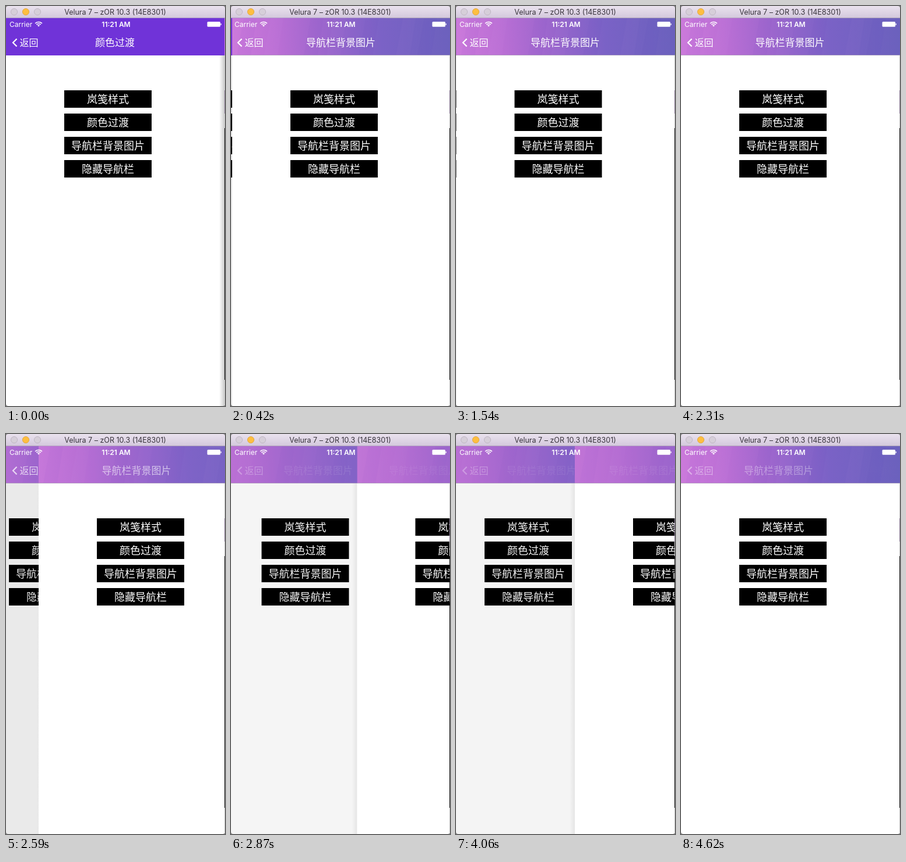
An HTML page with a canvas for the animation above (4.69 s loop, 376 by 688 pixels).

```html
<!DOCTYPE html>
<html lang="zh">
<head>
<meta charset="utf-8">
<style>
  html, body { margin: 0; width: 100%; height: 100%; overflow: hidden; background: #fff; }
  canvas { display: block; width: 376px; height: 688px; }
</style>
</head>
<body>
<canvas id="stage"></canvas>
<script>
const W = 376, H = 688, PAGE_W = 375, LOOP = 4690, STEP = 70;
const BAR_TOP = 20.5, BAR_BOTTOM = 85;
const LATIN = 'Inter, "Open Sans", sans-serif';
const CJK = '"Noto Sans CJK SC", "Noto Sans CJK", sans-serif';
const BUTTONS = ['岚笺样式', '颜色过渡', '导航栏背景图片', '隐藏导航栏'];
const PURPLE = { title: '颜色过渡', image: false };
const IMAGE = { title: '导航栏背景图片', image: true };

// Share of the width by which the upper page is dragged to the right.
const DRAG = [[2450, 0], [2870, .5773], [3150, .61], [3570, .4627], [3850, .44], [4200, .6]];
const PAGE_TRACK = [...DRAG, [4510, 1]];
const TITLE_TRACK = [...DRAG, [4620, .78]];

const canvas = document.getElementById('stage');
const ctx = canvas.getContext('2d');
const ratio = window.devicePixelRatio || 1;
canvas.width = W * ratio;
canvas.height = H * ratio;

const toHalf = v => Math.round(v * 2) / 2;

function along(track, t) {
  if (t <= track[0][0]) return track[0][1];
  for (let i = 1; i < track.length; i++) {
    const [t0, a] = track[i - 1], [t1, b] = track[i];
    if (t <= t1) {
      const u = (t - t0) / (t1 - t0);
      return a + (b - a) * u * u * (3 - 2 * u);
    }
  }
  return track[track.length - 1][1];
}

// Critically damped spring from 1 to 0.
function spring(ms) {
  const s = Math.max(0, ms) * .01826;
  const left = Math.exp(-s) * (1 + s);
  return left < .001 ? 0 : left;
}

function rect(x, y, w, h, fill) {
  ctx.fillStyle = fill;
  ctx.fillRect(x, y, w, h);
}

function text(str, x, y, font, { color = '#fff', align = 'center', alpha = 1 } = {}) {
  if (alpha <= 0) return;
  ctx.save();
  ctx.globalAlpha = alpha;
  ctx.font = font;
  ctx.textAlign = align;
  ctx.fillStyle = color;
  ctx.fillText(str, x, y);
  ctx.restore();
}

function gradient(x0, y0, x1, y1, stops) {
  const g = ctx.createLinearGradient(x0, y0, x1, y1);
  stops.forEach(([at, color]) => g.addColorStop(at, color));
  return g;
}

function barBackground(page, veil) {
  const height = BAR_BOTTOM - BAR_TOP;
  if (!page.image) return rect(0, BAR_TOP, W, height, '#7033d8');
  ctx.save();
  ctx.beginPath();
  ctx.rect(0, BAR_TOP, W, height);
  ctx.clip();
  rect(0, BAR_TOP, W, height, gradient(0, 60, W, 40, [
    [0, '#cb7adb'], [.2, '#bb6fd5'], [.42, '#9c66cd'], [.68, '#7a62c6'], [1, '#6b61bd']
  ]));
  for (let i = 0; i < 7; i++) {
    const x = 20 + i * 53 + 9 * Math.sin(i * 4);
    ctx.fillStyle = i % 2 ? 'rgba(255,190,255,.02)' : 'rgba(70,30,150,.025)';
    ctx.beginPath();
    ctx.moveTo(x, BAR_TOP);
    ctx.lineTo(x + 22, BAR_TOP);
    ctx.lineTo(x + 12, BAR_BOTTOM);
    ctx.lineTo(x - 12, BAR_BOTTOM);
    ctx.fill();
  }
  rect(0, BAR_TOP, W, height, `rgba(160,102,203,${veil})`);
  rect(0, BAR_BOTTOM - 1, W, 1, 'rgba(180,172,188,.7)');
  ctx.restore();
}

function drawPage(page, x, dim, veil) {
  ctx.save();
  ctx.translate(x, 0);
  rect(0, BAR_BOTTOM, W, H - BAR_BOTTOM, '#fff');
  BUTTONS.forEach((label, i) => {
    const y = 145 + i * 40;
    rect(100, y, 150, 30, '#000');
    text(label, 175, y + 22, '18px ' + CJK);
  });
  if (dim > 0) rect(0, BAR_BOTTOM, W, H - BAR_BOTTOM, `rgba(0,0,0,${dim})`);
  barBackground(page, veil);
  ctx.restore();
}

function drawShadow(x, alpha) {
  rect(x - 9, BAR_BOTTOM, 9, H - BAR_BOTTOM, gradient(x - 9, 0, x, 0, [
    [0, 'rgba(0,0,0,0)'], [1, `rgba(0,0,0,${alpha})`]
  ]));
}

function drawBack(alpha) {
  ctx.save();
  ctx.globalAlpha = alpha;
  ctx.strokeStyle = '#fff';
  ctx.lineWidth = 2.2;
  ctx.beginPath();
  ctx.moveTo(18.5, 56.5);
  ctx.lineTo(12, 63);
  ctx.lineTo(18.5, 69.5);
  ctx.stroke();
  ctx.restore();
  text('返回', 23.5, 69, '16px ' + CJK, { align: 'left', alpha });
}

function drawTitle(page, x, alpha) {
  text(page.title, x, 69.3, '500 17px ' + CJK, { alpha });
}

function drawStatus() {
  text('Carrier', 6, 35.5, '12px ' + LATIN, { align: 'left' });
  text('11:21 AM', 189, 35.5, '600 12px ' + LATIN);
  ctx.strokeStyle = ctx.fillStyle = '#fff';
  ctx.lineWidth = 1.7;
  for (const r of [5, 8]) {
    ctx.beginPath();
    ctx.arc(56, 35.5, r, -Math.PI * .76, -Math.PI * .24);
    ctx.stroke();
  }
  ctx.beginPath();
  ctx.moveTo(56, 35.5);
  ctx.arc(56, 35.5, 2.8, -Math.PI * .76, -Math.PI * .24);
  ctx.fill();
  ctx.beginPath();
  ctx.roundRect(345.5, 27, 22.5, 8.7, 1.5);
  ctx.roundRect(368.5, 29.7, 1.3, 3.4, .6);
  ctx.fill();
}

function drawWindowBar() {
  rect(0, 0, W, BAR_TOP, gradient(0, 0, 0, BAR_TOP, [[0, '#eae2ee'], [1, '#d3c8dc']]));
  [['#d6ced9', '#b9b0bd'], ['#fdbe41', '#dfa032'], ['#d6ced9', '#b9b0bd']].forEach(([fill, line], i) => {
    ctx.beginPath();
    ctx.arc(14 + i * 20, 10, 5.6, 0, Math.PI * 2);
    ctx.fillStyle = fill;
    ctx.fill();
    ctx.strokeStyle = line;
    ctx.lineWidth = .8;
    ctx.stroke();
  });
  text('Velura 7 – zOR 10.3 (14E8301)', 187.5, 15, '12.5px ' + LATIN, { color: '#38333c' });
}

function drawScene(t) {
  const popping = t >= 2450;
  const under = t < 1050 ? PURPLE : IMAGE;
  const push = spring(t - (t < 1050 ? 15 : 1066.4));
  const p = popping ? along(PAGE_TRACK, t) : push;
  const q = popping ? along(TITLE_TRACK, t) : push;
  const x = toHalf(p * PAGE_W);
  const veil = p * (1 - p);

  drawPage(under, toHalf(-112 * (1 - p)), .095 * (1 - p), veil);
  if (!popping || p < 1) {
    if (p > 0) drawShadow(x, .2 * p * p);
    drawPage(IMAGE, x, 0, veil);
  }

  const underAlpha = q ** (popping ? 4 : 2);
  const topAlpha = popping ? (1 - q) ** 3 : 1 - q;
  drawTitle(under, 98.5 + 88.5 * q, underAlpha);
  drawTitle(IMAGE, 187 + (popping ? 248 : 282) * q, topAlpha);
  drawBack(popping ? Math.min(1, q ** 4 + (1 - q) ** 2) : 1);
}

function draw(t) {
  ctx.setTransform(ratio, 0, 0, ratio, 0, 0);
  rect(0, 0, W, H, '#808080');
  ctx.save();
  ctx.beginPath();
  ctx.roundRect(0, 0, W, H, 4);
  ctx.clip();
  drawScene(t);
  drawStatus();
  drawWindowBar();
  rect(375, BAR_BOTTOM, 1, H - BAR_BOTTOM, '#c9c9c9');
  rect(375, 145, 1, 40, '#8c7d96');
  rect(375, 210, 1, 433, '#161616');
  ctx.restore();
}

const start = performance.now();
function tick() {
  const t = (performance.now() - start) % LOOP;
  draw(Math.floor(t / STEP) * STEP);
  requestAnimationFrame(tick);
}
tick();
</script>
</body>
</html>
```
